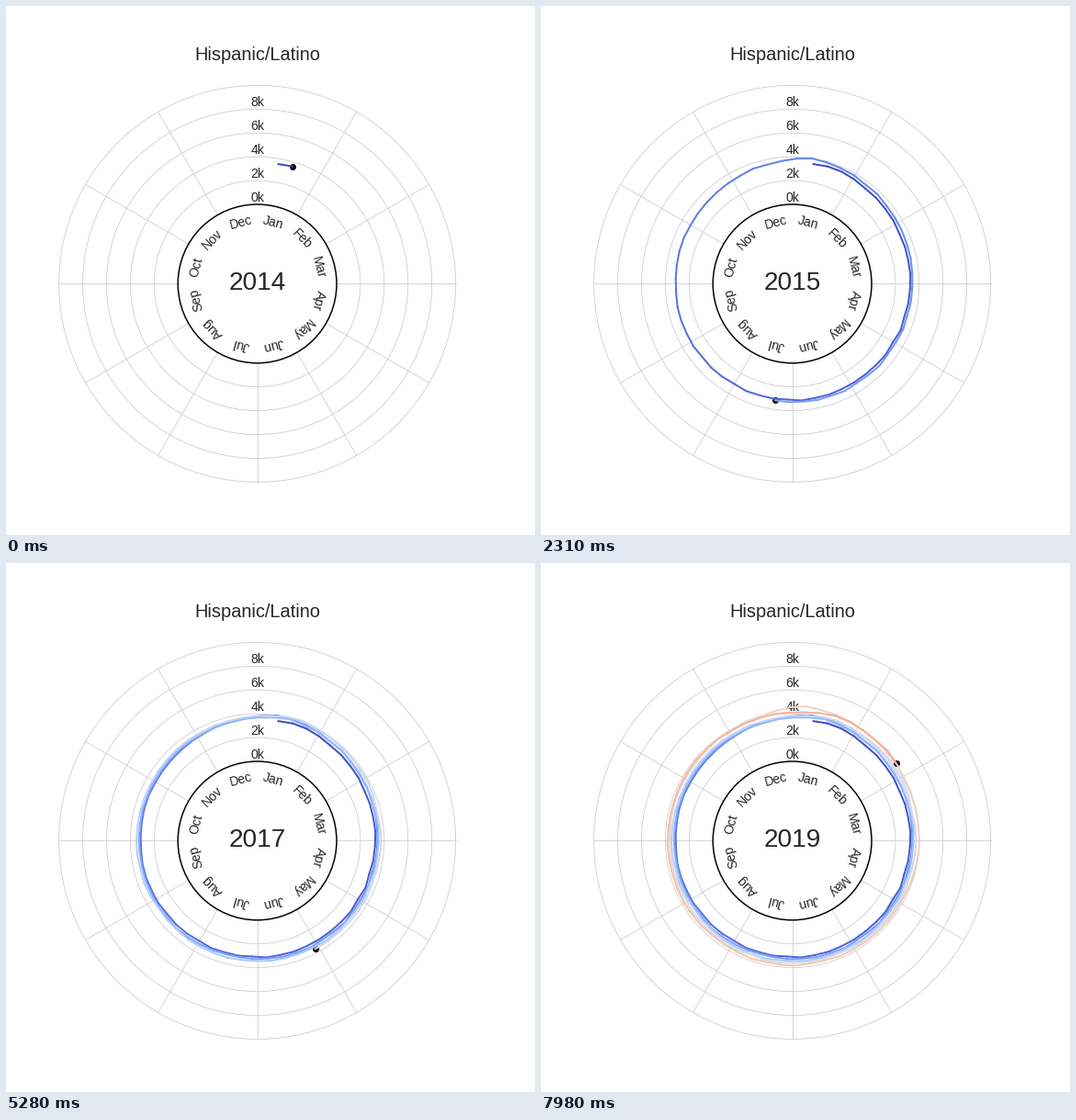
A matplotlib script for the animation above (8 s loop, 576 by 576 pixels).

```python
import numpy as np
import matplotlib.pyplot as plt
from matplotlib.animation import FuncAnimation
from matplotlib.collections import LineCollection
from matplotlib.patches import Circle

plt.rcParams["font.family"] = "Liberation Sans"

SIZE, DPI = 576, 72
CX, CY = 273.6, 302.4
R_IN, R_OUT = 86.4, 216.0
PX_PER_K = (R_OUT - R_IN) / 10
FRAMES, INTERVAL = 267, 30
WEEKS = FRAMES + 1
ALL_WEEKS = 380          # span of the colour scale
INK = "0.15"
GRID = "0.8"
MONTHS = "Jan Feb Mar Apr May Jun Jul Aug Sep Oct Nov Dec".split()

# Winter peaks: years since January 2014, extra thousands
PEAKS = [(0.04, 0.65), (1.025, 0.86), (2.04, 0.55),
         (3.05, 0.62), (4.015, 1.10), (5.06, 0.66)]
RISE, FALL = 0.08, 0.17


def polar(r, theta):
    """Clockwise from the top, in stage pixels."""
    return CX + r * np.sin(theta), CY - r * np.cos(theta)


def weekly_count(t):
    """Steady growth plus winter peaks with a steep rise and a slow fall."""
    count = 3.0 + 0.16 * t
    for when, height in PEAKS:
        d = t - when
        count += height * np.exp(-np.abs(d) / np.where(d < 0, RISE, FALL))
    return count + np.random.default_rng(4).normal(0, 0.03, t.size)


years = (10 + 7 * np.arange(WEEKS)) / 365
points = np.column_stack(polar(R_IN + weekly_count(years) * PX_PER_K,
                               2 * np.pi * years))
segments = np.stack([points[:-1], points[1:]], axis=1)
colors = plt.get_cmap("coolwarm")(np.arange(WEEKS - 1) / ALL_WEEKS)

fig = plt.figure(figsize=(SIZE / DPI, SIZE / DPI), dpi=DPI, facecolor="white")
ax = fig.add_axes([0, 0, 1, 1])
ax.set(xlim=(0, SIZE), ylim=(SIZE, 0))
ax.axis("off")


def ring(r, color, width, z):
    ax.add_patch(Circle((CX, CY), r, fill=False, ec=color, lw=width, zorder=z))


def label(x, y, text, size, z=3, **kw):
    kw = {"ha": "center", "va": "center", "color": INK, **kw}
    return ax.text(x, y, text, fontsize=size, zorder=z, **kw)


# No spoke at the top, where the scale stands
for a in np.arange(1, 12) * np.pi / 6:
    (x0, y0), (x1, y1) = polar(R_IN, a), polar(R_OUT, a)
    ax.plot([x0, x1], [y0, y1], color=GRID, lw=0.8, zorder=0.5)

for k in range(0, 10, 2):
    ring(R_IN + (k + 2) * PX_PER_K, GRID, 0.8, 0.5)
    label(CX, CY - R_IN - k * PX_PER_K, f"{k}k", 14, z=0.6, va="bottom")

ring(R_IN, "black", 1.5, 2.5)
for i, name in enumerate(MONTHS):
    deg = 15 + 30 * i
    label(*polar(68.5, np.radians(deg)), name, 14, rotation=-deg)

label(CX, 59, "Hispanic/Latino", 20, va="baseline")
year = label(CX, CY, "2014", 28)

dot, = ax.plot([], [], "o", color="black", ms=7, mew=0, zorder=1)
trail = LineCollection([], linewidths=2, capstyle="round", zorder=2)
ax.add_collection(trail, autolim=False)


def update(i):
    week = i + 1
    trail.set_segments(segments[:week])
    trail.set_color(colors[:week])
    dot.set_data(points[week:week + 1, 0], points[week:week + 1, 1])
    year.set_text(str(2014 + int((10 + 7 * week) / 365.2)))
    return trail, dot, year


anim = FuncAnimation(fig, update, frames=FRAMES, interval=INTERVAL,
                     init_func=lambda: update(0), repeat=True, repeat_delay=0)
plt.show()
```
